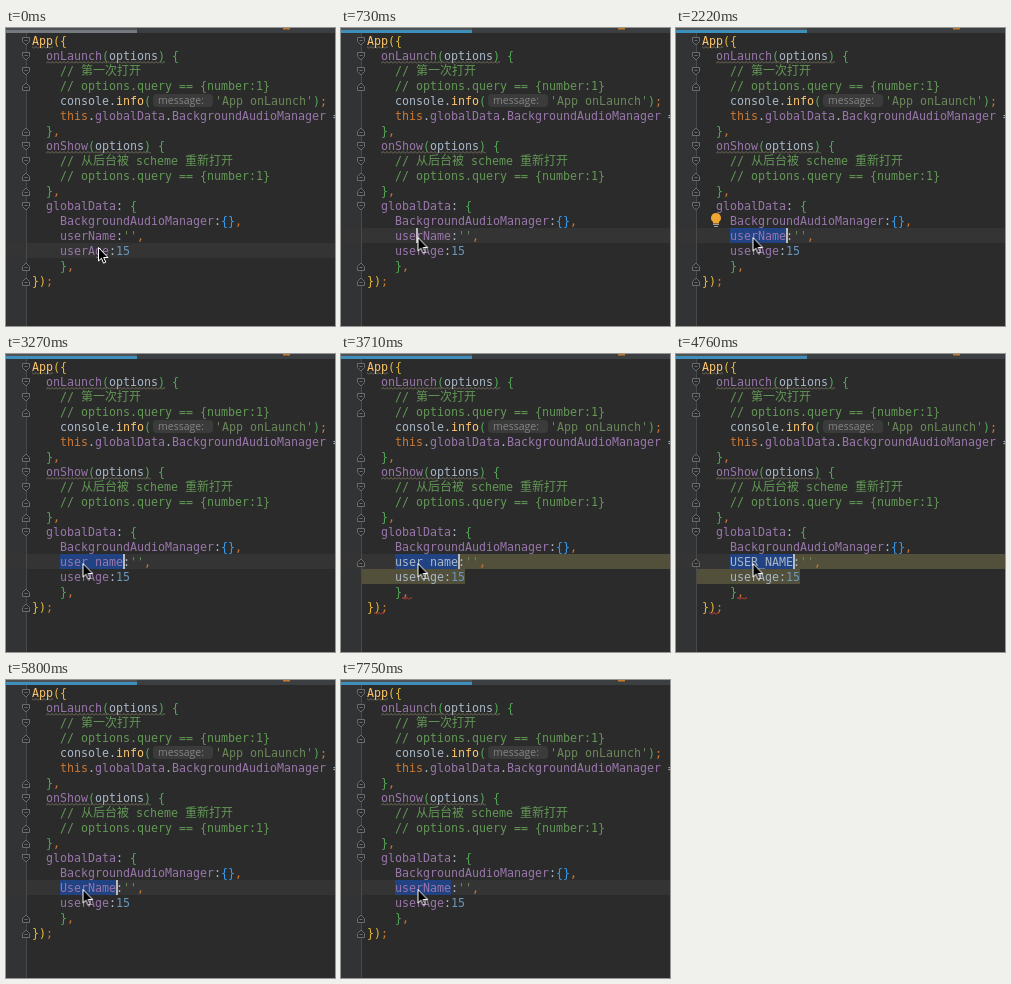
Animation of 329 by 298 pixels, one loop 8 s. Source, as an HTML page:

```html
<!DOCTYPE html>
<html lang="zh">
<head>
<meta charset="utf-8">
<title>Switching identifier case in an editor</title>
<style>
html, body { margin: 0; width: 100%; height: 100%; overflow: hidden; background: #2b2b2b; }
svg { display: block; width: 329px; height: 298px; }
text {
  font: 11.63px "DejaVu Sans Mono", "Noto Sans CJK SC", "Noto Sans CJK", monospace;
  white-space: pre;
  fill: #a9b7c6;
}
.prop { fill: #9876aa; }
.key { fill: #cc7832; }
.fn { fill: #ffc66d; }
.str { fill: #6a8759; }
.num { fill: #6897bb; }
.note, .note text { fill: #629755; }
.han { font-size: 12px; }
.b1 { fill: #e8ba36; }
.b2 { fill: #54a857; }
.b3 { fill: #359ff4; }
.hint { font: 10.5px "Open Sans", "Noto Sans", sans-serif; fill: #848484; }

/* every change is a hard cut within one 8 s loop */
.anim { animation: 8s step-end infinite; }
#mouse { animation-name: mouse; }
#tab { animation-name: tab; }
#row { animation-name: row; }
#pick { animation-name: pick; }
#caret { animation-name: caret; }
#tail { animation-name: tail; }
#bulb { animation-name: bulb; }
.bad { animation-name: bad; }
.good { animation-name: good; }
.tint { animation-name: tint; }
#camel { animation-name: camel; }
#snake { animation-name: snake; }
#space { animation-name: space; }
#kebab { animation-name: kebab; }
#upper { animation-name: upper; }
#pascal { animation-name: pascal; }

@keyframes mouse {
  0% { transform: translate(92px, 219px); }
  1.75% { transform: translate(82.5px, 224px); }
  3.5% { transform: translate(81px, 221px); }
  5.375% { transform: translate(77.5px, 212px); }
  7.25%, 100% { transform: translate(76.5px, 209px); }
}
@keyframes tab { 0% { fill: #747a80; } 9.125%, 100% { fill: #3f8fbd; } }
@keyframes row { 0% { transform: translateY(15px); } 9.125%, 100% { transform: none; } }
@keyframes pick {
  0% { width: 0; }
  11% { width: 56px; }
  33.375% { width: 63px; }
  72.5%, 100% { width: 56px; }
}
@keyframes caret {
  0% { opacity: 0; transform: translateX(75px); }
  9.125% { opacity: 1; transform: translateX(75px); }
  11% { opacity: 1; transform: translateX(110px); }
  20.25% { opacity: 0; transform: translateX(110px); }
  27.75% { opacity: 1; transform: translateX(110px); }
  33.375% { opacity: 1; transform: translateX(117px); }
  70.75% { opacity: 0; transform: translateX(117px); }
  72.5% { opacity: 1; transform: translateX(110px); }
  96.875%, 100% { opacity: 0; transform: translateX(110px); }
}
@keyframes tail {
  0% { transform: none; }
  33.375% { transform: translateX(7px); }
  72.5%, 100% { transform: none; }
}
@keyframes bulb {
  0% { opacity: 0; }
  18.5% { opacity: 1; }
  33.375% { opacity: 0; }
  70.75% { opacity: 1; }
  72.5%, 100% { opacity: 0; }
}
@keyframes bad { 0% { opacity: 0; } 46.375% { opacity: 1; } 65.125%, 100% { opacity: 0; } }
@keyframes good { 0% { opacity: 1; } 46.375% { opacity: 0; } 65.125%, 100% { opacity: 1; } }
@keyframes tint { 0% { fill: #9876aa; } 46.375% { fill: #a9b7c6; } 65.125%, 100% { fill: #9876aa; } }
@keyframes camel { 0% { opacity: 1; } 33.375% { opacity: 0; } 83.75%, 100% { opacity: 1; } }
@keyframes snake { 0% { opacity: 0; } 33.375% { opacity: 1; } 40.875%, 100% { opacity: 0; } }
@keyframes space { 0% { opacity: 0; } 40.875% { opacity: 1; } 48.25%, 100% { opacity: 0; } }
@keyframes kebab { 0% { opacity: 0; } 48.25% { opacity: 1; } 59.5%, 100% { opacity: 0; } }
@keyframes upper { 0% { opacity: 0; } 59.5% { opacity: 1; } 72.5%, 100% { opacity: 0; } }
@keyframes pascal { 0% { opacity: 0; } 72.5% { opacity: 1; } 83.75%, 100% { opacity: 0; } }
</style>
</head>
<body>
<svg viewBox="0 0 329 298">
  <defs>
    <pattern id="weak" width="4" height="3" patternUnits="userSpaceOnUse">
      <path d="M0 2.5L2 .5L4 2.5" fill="none" stroke="#85806a" stroke-width=".8"/>
    </pattern>
    <pattern id="error" width="4" height="3" patternUnits="userSpaceOnUse">
      <path d="M0 2.5L2 .5L4 2.5" fill="none" stroke="#d0403a"/>
    </pattern>
    <g id="open" fill="#2b2b2b" stroke="#6a6d70">
      <path d="M16.5 -3.5h7v4l-3.5 3.5l-3.5 -3.5z"/><path d="M18.5 -.5h3"/>
    </g>
    <g id="close" fill="#2b2b2b" stroke="#6a6d70">
      <path d="M16.5 4.5h7v-4l-3.5 -3.5l-3.5 3.5z"/><path d="M18.5 1.5h3"/>
    </g>
  </defs>

  <!-- tab strip, gutter, line highlights -->
  <rect width="329" height="298" fill="#2b2b2b"/>
  <rect y="5" width="20" height="293" fill="#313335"/>
  <rect width="329" height="5" fill="#3c3f41"/>
  <rect width="131" height="2" fill="#4e5254"/>
  <rect id="tab" class="anim" y="2" width="131" height="3"/>
  <rect x="277" width="7" height="1.5" fill="#c9772c"/>
  <rect id="row" class="anim" y="200" width="329" height="15" fill="#343434"/>
  <path class="anim bad" d="M54 200H329V215H124V230H20V215H54z" fill="#52503a"/>
  <path d="M20.5 5V298" stroke="#47494b"/>

  <!-- fold markers -->
  <use href="#open" y="13"/><use href="#open" y="28"/><use href="#open" y="43"/>
  <use href="#close" y="58"/><use href="#close" y="103"/><use href="#open" y="118"/>
  <use href="#open" y="133"/><use href="#close" y="148"/><use href="#close" y="163"/>
  <use href="#open" y="178"/>
  <g class="anim good"><use href="#close" y="238"/><use href="#close" y="253"/></g>
  <g class="anim bad"><use href="#close" y="208"/></g>

  <!-- wavy underlines -->
  <g fill="url(#weak)">
    <rect x="26" y="18" width="21" height="3"/>
    <rect x="40" y="33" width="119" height="3"/>
    <rect x="40" y="123" width="105" height="3"/>
  </g>
  <g class="anim bad" fill="url(#error)">
    <rect x="61" y="243" width="10" height="3"/>
    <rect x="33" y="258" width="10" height="3"/>
  </g>

  <!-- code -->
  <text x="26" y="17"><tspan class="fn">App</tspan><tspan class="b1">({</tspan></text>
  <text x="40" y="32"><tspan class="prop">onLaunch</tspan><tspan class="b2">(</tspan>options<tspan class="b2">) {</tspan></text>
  <text x="54" y="47" class="note">// <tspan class="han">第一次打开</tspan></text>
  <text x="54" y="62" class="note">// options.query == {number:1}</text>
  <text x="54" y="77">console.<tspan class="fn">info</tspan><tspan class="b2">(</tspan></text>
  <rect x="147" y="66" width="60" height="13" rx="4" fill="#3b3b3b"/>
  <text x="152" y="76" class="hint">message:</text>
  <text x="209" y="77"><tspan class="str">'App onLaunch'</tspan><tspan class="b2">)</tspan><tspan class="key">;</tspan></text>
  <text x="54" y="92"><tspan class="key">this</tspan>.<tspan class="prop">globalData</tspan>.<tspan class="prop">BackgroundAudioManager</tspan> =</text>
  <text x="40" y="107"><tspan class="b2">}</tspan><tspan class="key">,</tspan></text>
  <text x="40" y="122"><tspan class="prop">onShow</tspan><tspan class="b2">(</tspan>options<tspan class="b2">) {</tspan></text>
  <text x="54" y="137" class="note">// <tspan class="han">从后台被</tspan> scheme <tspan class="han">重新打开</tspan></text>
  <text x="54" y="152" class="note">// options.query == {number:1}</text>
  <text x="40" y="167"><tspan class="b2">}</tspan><tspan class="key">,</tspan></text>
  <text x="40" y="182"><tspan class="prop">globalData</tspan>: <tspan class="b2">{</tspan></text>
  <text x="54" y="197"><tspan class="prop">BackgroundAudioManager</tspan>:<tspan class="b3">{}</tspan><tspan class="key">,</tspan></text>

  <rect id="pick" class="anim" x="54" y="200" width="0" height="15" fill="#214283"/>
  <g id="camel" class="anim"><text x="54" y="212" class="prop">userName</text></g>
  <g id="snake" class="anim"><text x="54" y="212" class="prop">user_name</text></g>
  <g id="space" class="anim"><text x="54" y="212" class="anim tint">user name</text></g>
  <g id="kebab" class="anim"><text x="54" y="212" class="anim tint">user-name</text></g>
  <g id="upper" class="anim"><text x="54" y="212" class="anim tint">USER_NAME</text></g>
  <g id="pascal" class="anim"><text x="54" y="212" class="prop">UserName</text></g>
  <g id="tail" class="anim"><text x="110" y="212">:<tspan class="str">''</tspan><tspan class="key">,</tspan></text></g>
  <rect id="caret" class="anim" y="200" width="2" height="15" fill="#bbbbbb"/>

  <text x="54" y="227"><tspan class="anim tint">userAge</tspan>:<tspan class="num">15</tspan></text>
  <text x="54" y="242"><tspan class="b2">}</tspan><tspan class="key">,</tspan></text>
  <text x="26" y="257"><tspan class="b1">})</tspan><tspan class="key">;</tspan></text>

  <g id="bulb" class="anim">
    <path d="M40 185a5 5 0 0 1 3 9v1.5h-6v-1.5a5 5 0 0 1 3 -9z" fill="#f0a732"/>
    <path d="M37 196.5h6M38 198.5h4" stroke="#9da0a3"/>
  </g>

  <g id="mouse" class="anim">
    <path d="M.5 .5V14l3 -2.8l2 5l2.3 -1l-2.1 -4.7h4.3z" fill="#000" stroke="#fff" stroke-linejoin="round"/>
  </g>
</svg>
</body>
</html>
```
